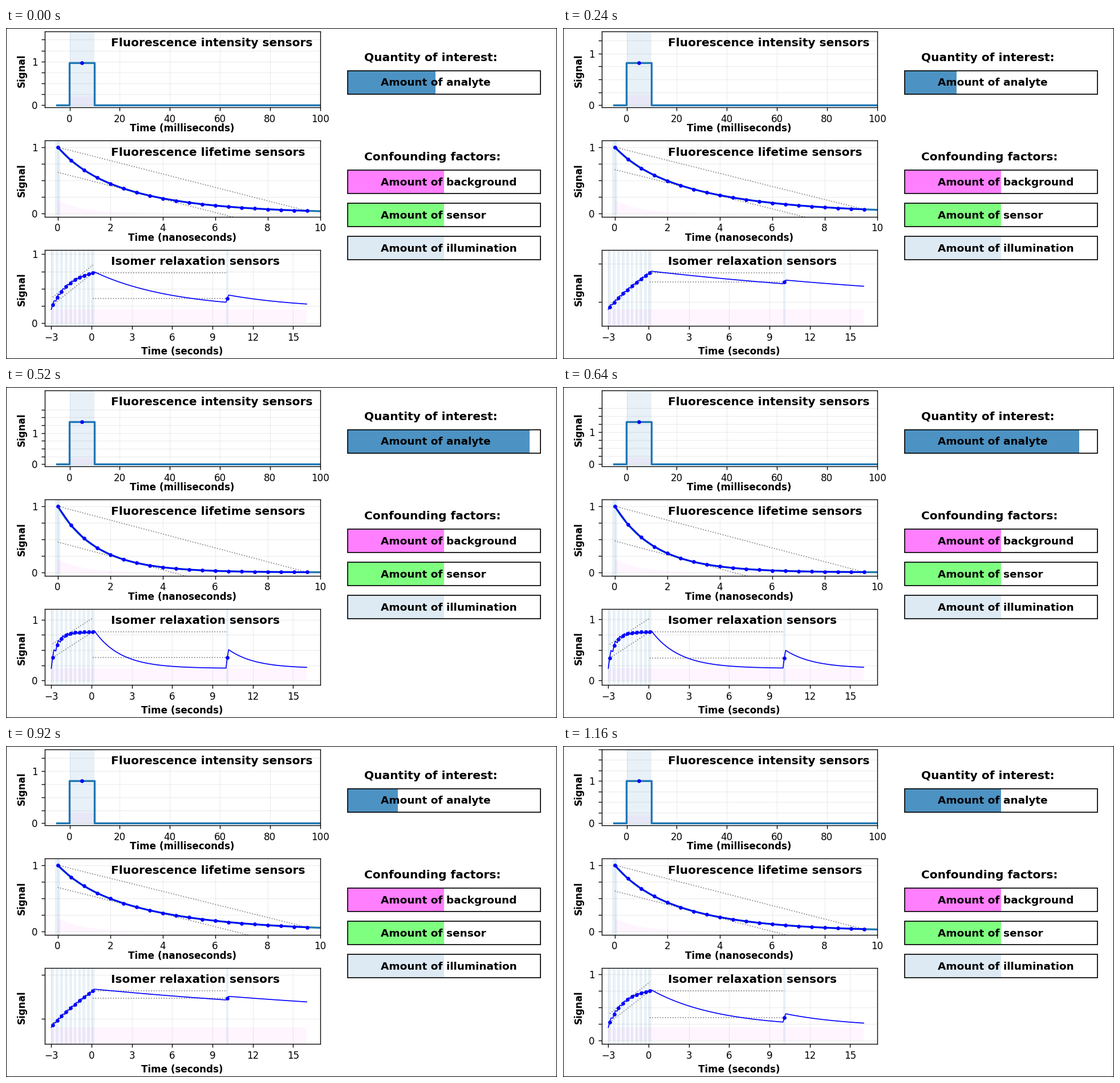
A matplotlib script that plays this animation: 966x580 px, repeating every 1400 ms.

```python
import numpy as np
import matplotlib.pyplot as plt
from matplotlib.animation import FuncAnimation
from matplotlib.patches import Rectangle

W, H, DPI = 966, 580, 120.75
INTERVAL, FRAMES, MOVING = 40, 35, 30
LEFT, WIDTH, HEIGHT = 0.07, 0.5, 0.23
BACKGROUND, TRACE, SHADE = 0.2, "tab:blue", dict(color="tab:blue", alpha=0.1, lw=0)
PINK = dict(color="magenta", alpha=0.04, lw=0)

plt.rcParams["font.family"] = "DejaVu Sans"
fig = plt.figure(figsize=(W / DPI, H / DPI), dpi=DPI, facecolor="white",
                 edgecolor="black", linewidth=1)


def label(x, y, text, size, **kw):
    """Bold text with its baseline at figure position (x, y)."""
    fig.text(x, y, text, size=size, weight="bold", va="baseline", **kw)


def panel(bottom, title, xlabel, pad, xlim, xticks):
    ax = fig.add_axes([LEFT, bottom, WIDTH, HEIGHT])
    yticks = np.arange(0, 2, 0.25)
    ax.set_xticks(xticks)
    ax.set_yticks(yticks, [f"{v:.0f}" if v % 1 == 0 else "" for v in yticks])
    ax.set_xlim(*xlim)
    ax.set_ylim(-0.05, 1.1)
    ax.grid(alpha=0.2)
    ax.set_axisbelow(True)
    ax.set_xlabel(xlabel, size=10, weight="bold", labelpad=pad)
    label(LEFT + 0.24 * WIDTH, bottom + 0.8 * HEIGHT, title, 12)
    label(0.0342, bottom + 0.48 * HEIGHT, "Signal", 10, ha="center",
          rotation=90, rotation_mode="anchor")
    return ax


def dotted(ax):
    return ax.plot([], [], ":", color="gray", lw=1)[0]


def gauge(bottom, name, color, alpha, level=0.5):
    x, width, height = 0.62, 0.35, 0.07
    fill = Rectangle((x, bottom), width * level, height, color=color, alpha=alpha, lw=0)
    frame = Rectangle((x, bottom), width, height, fill=False, ec="black", lw=1)
    for patch in (fill, frame):
        patch.set_transform(fig.transFigure)
        fig.add_artist(patch)
    label(0.68, bottom + 0.025, f"Amount of {name}", 11)
    return fill


# Isomer protocol: (duration, lit); every pulse is read out at its middle
PULSE = [(0.1, True), (0.1, True)]
PROTOCOL = (PULSE + [(2 / 15, False)]) * 9 + PULSE + [(9.8, False)] + PULSE + [(5.8, False)]


def isomer(analyte):
    """Return the curve and the readouts of the isomer sensor."""
    rate = 0.695 * analyte - 0.1475
    t, y, ts, ys, dots = -3.0, 0.0, [], [], []
    first_half = True
    for duration, lit in PROTOCOL:
        goal, speed = (2 / 3, 6 * rate) if lit else (0, rate)
        s = np.linspace(0, duration, 3 if duration < 1 else 80)
        seg = goal + (y - goal) * np.exp(-speed * s)
        ts.append(t + s)
        ys.append(BACKGROUND + seg)
        t, y = t + duration, seg[-1]
        if lit:
            if first_half:
                dots.append((t, BACKGROUND + y))
            first_half = not first_half
    return np.concatenate(ts), np.concatenate(ys), np.array(dots)


def lifetime(t, analyte):
    return BACKGROUND * np.exp(-t) + 0.8 * np.exp(-t / (4.5 - 3 * analyte))


def analyte_at(i):
    phase = 3 * np.pi - 0.3205 * (MOVING - 1 - min(i, MOVING - 1))
    return 0.5 * 2 ** -np.sin(phase)


# Intensity panel
ax1 = panel(0.76, "Fluorescence intensity sensors", "Time (milliseconds)", -1,
            (-10, 100), range(0, 101, 20))
ax1.axvspan(0, 10, **SHADE)
ax1.fill_between([0, 10], 0, BACKGROUND, **PINK)
step, = ax1.plot([], [], color=TRACE, lw=2, snap=False)
step_dot, = ax1.plot([], [], "bo", ms=3)

# Lifetime panel
ax2 = panel(0.43, "Fluorescence lifetime sensors", "Time (nanoseconds)", -1,
            (-0.5, 10), range(0, 11, 2))
fine, samples = np.linspace(0, 10, 201), np.arange(20) / 2
ax2.axvspan(-0.1, 0.1, **SHADE)
ax2.fill_between(fine, 0, BACKGROUND * np.exp(-fine), **PINK)
chord, tangent = dotted(ax2), dotted(ax2)
decay, = ax2.plot([], [], color=TRACE, lw=2)
decay_dots, = ax2.plot([], [], "bo-", ms=3, lw=1.5)

# Isomer panel
ax3 = panel(0.1, "Isomer relaxation sensors", "Time (seconds)", 4,
            (-3.5, 17), range(-3, 16, 3))
for start in [*(np.arange(10) / 3 - 3), 10]:
    ax3.axvspan(start, start + 0.2, **SHADE)
ax3.fill_between([-3, 16], 0, BACKGROUND, **PINK)
rise, rise_top, level_a, level_b = (dotted(ax3) for _ in range(4))
curve, = ax3.plot([], [], "b-", lw=1)
curve_dots, = ax3.plot([], [], "bo", ms=3)
REST_GAIN = isomer(0.5)[2][9, 1] - BACKGROUND

# Gauges
label(0.65, 0.9, "Quantity of interest:", 12)
label(0.65, 0.6, "Confounding factors:", 12)
analyte_bar = gauge(0.8, "analyte", TRACE, 0.8)
gauge(0.5, "background", "magenta", 0.5)
gauge(0.4, "sensor", "lime", 0.5)
gauge(0.3, "illumination", TRACE, 0.15)


def update(i):
    analyte = analyte_at(i)
    analyte_bar.set_width(0.35 * analyte)

    signal = BACKGROUND + 0.8 * (0.5 + analyte)
    step.set_data([-5, 0, 0, 10, 10, 100], [0, 0, signal, signal, 0, 0])
    step_dot.set_data([5], [signal])
    ax1.set_ylim(-0.05 * signal, 1.75 * signal)

    values = lifetime(samples, analyte)
    decay.set_data(fine, lifetime(fine, analyte))
    decay_dots.set_data(samples, values)
    line = np.interp(samples, samples[[0, -1]], values[[0, -1]])
    chord.set_data(samples, line)
    tangent.set_data(samples, line + (values - line).min())

    t, y, dots = isomer(analyte)
    curve.set_data(t, y)
    curve_dots.set_data(dots[:, 0], dots[:, 1])
    train_t, train = dots[:10, 0], dots[:10, 1]
    line = np.interp(train_t, train_t[[0, -1]], train[[0, -1]])
    rise.set_data(train_t, line)
    rise_top.set_data(train_t, line + (train - line).max())
    level_a.set_data(dots[9:, 0], [dots[9, 1]] * 2)
    level_b.set_data(dots[9:, 0], [dots[10, 1]] * 2)
    scale = (train[-1] - BACKGROUND) / REST_GAIN
    ax3.set_ylim(BACKGROUND - 0.25 * scale, BACKGROUND + 0.9 * scale)
    return []


anim = FuncAnimation(fig, update, frames=FRAMES, interval=INTERVAL, repeat=True,
                     repeat_delay=0, blit=False)
plt.show()
```
